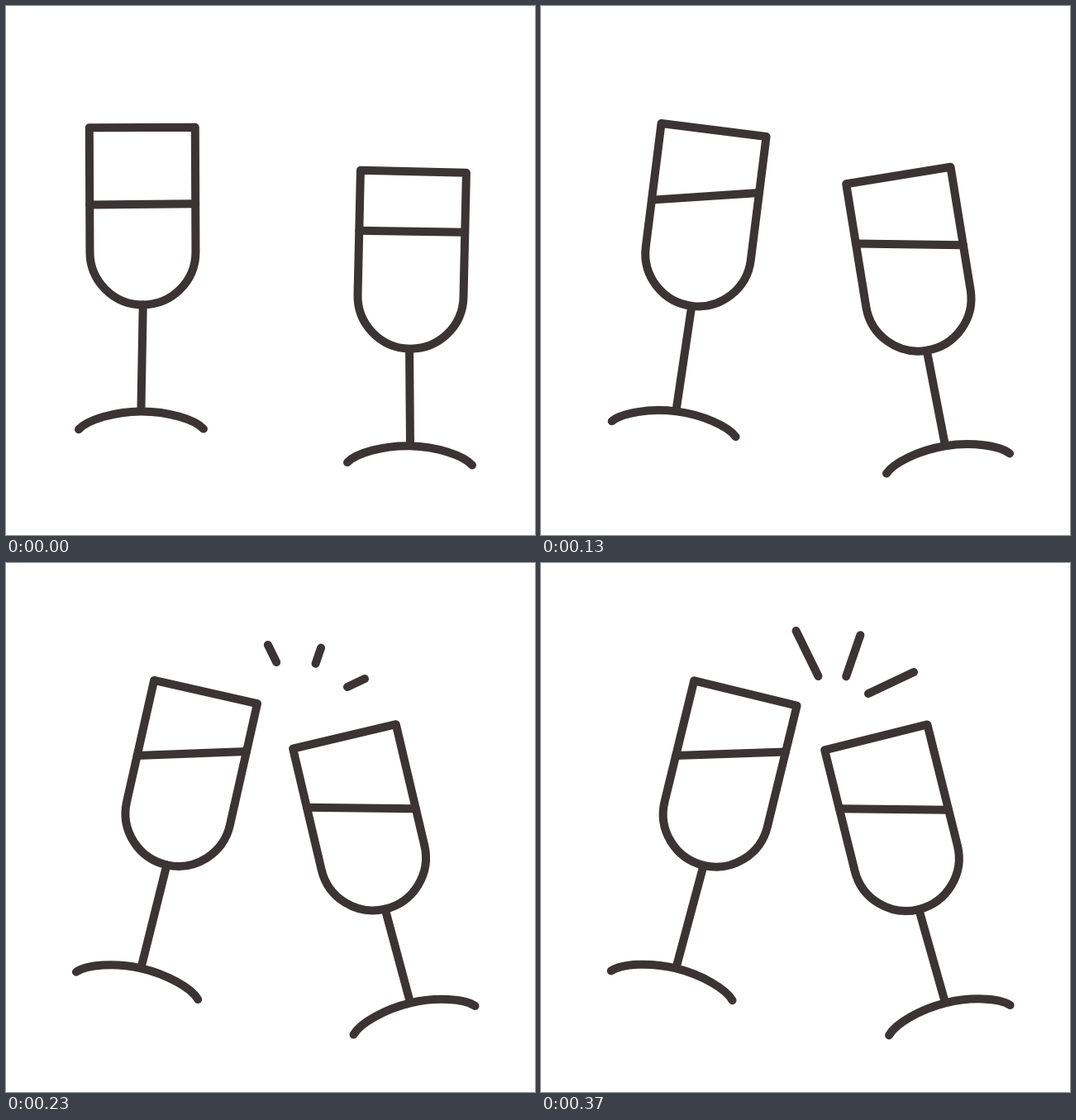
Write an HTML page with a canvas that moves like this. It is 640 px wide and 640 px high and loops after 860 ms.

```html
<!DOCTYPE html>
<html lang="en">
<head>
<meta charset="utf-8">
<title>Clinking glasses</title>
<style>
html, body { margin: 0; height: 100%; overflow: hidden; background: #fff; }
canvas { display: block; width: 100vmin; height: 100vmin; }
</style>
</head>
<body>
<canvas width="640" height="640"></canvas>
<script>
const ctx = document.querySelector('canvas').getContext('2d');
const LOOP = 860;
const STEPS = 9;
const BURST_STEP = 5;
const RADIUS = 64;
const WALL = 150.5;

// Each glass turns about its foot; the liquid pivots on the left wall
const LEFT = { x: 163.4, y: 489.9, bowlX: 2.9, top: -342.9, from: -.25, to: 13.7, liquid: [93.3, 92.5, 57.6] };
const RIGHT = { x: 489, y: 531.8, bowlX: -3.6, top: -331.6, from: 1.3, to: -14, liquid: [73.1, 72, 106.5] };

// Centre and half extent
const RAYS = [[322, 109.5, 13.5, 27.5], [377.8, 112.2, -8.6, 25], [423.5, 145, 27.5, -13]];

const mix = (a, b, p) => a + (b - a) * p;

// Cubic Bezier easing with flat ends: handles at (x1, 0) and (x2, 1)
function ease(p, x1, x2) {
  let low = 0, high = 1, s;
  for (let i = 0; i < 24; i++) {
    s = (low + high) / 2;
    const x = 3 * s * (1 - s) * (x1 * (1 - s) + x2 * s) + s ** 3;
    if (x < p) low = s; else high = s;
  }
  return s * s * (3 - 2 * s);
}

// 30 ticks a second on a 10 ms grid; every sixth tick repeats the last pose
function stepAt(time) {
  const tick = Math.floor((Math.floor(time / 10) + .5) * .3);
  return Math.min(STEPS, tick - Math.floor((tick + 3) / 6));
}

function line(x1, y1, x2, y2) {
  ctx.beginPath();
  ctx.moveTo(x1, y1);
  ctx.lineTo(x2, y2);
  ctx.stroke();
}

function drawGlass({ x, y, bowlX, top, from, to, liquid }, tilt, slosh) {
  const left = bowlX - RADIUS, right = bowlX + RADIUS;
  ctx.save();
  ctx.translate(x, y);
  ctx.rotate(mix(from, to, tilt) * Math.PI / 180);

  ctx.beginPath();
  ctx.moveTo(left, top);
  ctx.lineTo(right, top);
  ctx.arc(bowlX, top + WALL, RADIUS, 0, Math.PI);
  ctx.closePath();
  ctx.stroke();

  line(left, top + liquid[0], right, top + mix(liquid[1], liquid[2], slosh));
  line(bowlX, top + WALL + RADIUS, 0, 0);

  ctx.beginPath();
  ctx.moveTo(-75.5, 22);
  ctx.bezierCurveTo(-65, 10.5, -32, .5, 0, .5);
  ctx.bezierCurveTo(32, .5, 65, 10.5, 75.5, 22);
  ctx.stroke();
  ctx.restore();
}

function draw(time) {
  const step = stepAt(time);
  const leftTilt = ease(step / STEPS, .35, .17);
  const rightTilt = ease(step / STEPS, .33, 0);
  const burst = Math.sin((step - BURST_STEP) / (STEPS - BURST_STEP) * Math.PI / 2);

  ctx.fillStyle = '#fff';
  ctx.fillRect(0, 0, 640, 640);
  ctx.strokeStyle = '#3c3335';
  ctx.lineWidth = 10;
  ctx.lineCap = ctx.lineJoin = 'round';

  drawGlass(LEFT, leftTilt, rightTilt);
  drawGlass(RIGHT, rightTilt, rightTilt);
  if (step > BURST_STEP) {
    for (const [x, y, dx, dy] of RAYS) {
      line(x - dx * burst, y - dy * burst, x + dx * burst, y + dy * burst);
    }
  }
}

const start = performance.now();
function tick() {
  draw((performance.now() - start) % LOOP);
  requestAnimationFrame(tick);
}
tick();
</script>
</body>
</html>
```
